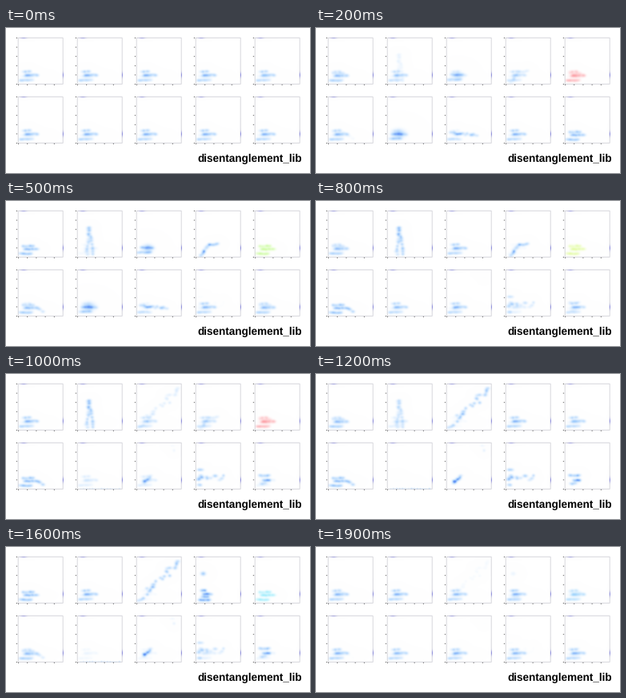
Write a matplotlib script that moves like this. It is 380 px wide and 182 px high and loops after 2 s.

```python
import colorsys

import matplotlib.pyplot as plt
import numpy as np
from matplotlib.animation import FuncAnimation
from matplotlib.patches import Rectangle

W, H, DPI = 380, 182, 100
FRAMES, INTERVAL = 20, 100
PW, PH = 57, 59              # panel size in pixels
COLS, STEP = 5, 74

plt.rcParams["text.hinting"] = "none"

X, Y = np.meshgrid(np.arange(PW), np.arange(PH))
rng = np.random.default_rng(7)


def lump(x, y, sx, sy, strength):
    return strength * np.exp(-((X - x) / sx) ** 2 / 2 - ((Y - y) / sy) ** 2 / 2)


def trail(a, b, n, spread=1.0, size=1.4, strength=.5):
    """Uneven soft lumps strewn along the line from a to b."""
    total = np.zeros((PH, PW))
    for t in (np.arange(n) + .5) / n:
        x, y = np.add(a, t * np.subtract(b, a)) + rng.uniform(-spread, spread, 2)
        total += lump(x, y, size * rng.uniform(1, 1.5), size,
                      strength * rng.uniform(.4, 1))
    return total


def rows(*spans, strength=.4):
    """Horizontal bands, each given as (x start, x end, y)."""
    return sum(trail((x0, y), (x1, y), round((x1 - x0) / 2.5), .5,
                     strength=strength) for x0, x1, y in spans)


CAR = rows((5, 16, 42), (8, 25, 46.5), (1, 18, 53)) + lump(12, 48, 5, 1.5, .3)
SOFT = rows((4, 21, 44), (6, 25, 48), (1, 18, 53.5))
COLUMN = (trail((14, 20), (12, 56), 11, .8) + trail((14, 20), (20, 56), 11, .8))
ROUND = lump(14, 46.5, 4, 3, .6) + rows((4, 21, 46), (1, 18, 52))
DIAGONAL = trail((3, 55), (54, 3), 26, 4)
ARCH = trail((6, 56), (15, 43), 8) + trail((15, 43), (28, 41), 5)
STACK = lump(9, 21, 2.2, 1.8, .6) + rows((6, 13, 42), (8, 20, 46.5),
                                         (6, 16, 50), (4, 19, 54), strength=.6)
TAIL = SOFT + trail((24, 47), (31, 53), 3)
BLOCK = lump(14, 46, 5, 3.5, .8) + rows((4, 24, 47), (2, 18, 52))
FLOOR = trail((2, 57.5), (54, 57.5), 14, .3, .8, .35)
SPREAD = trail((3, 45), (39, 48), 15, 1.5) + rows((1, 18, 53), strength=.3)
KNOT = trail((7, 52), (17, 42), 11, 2) + trail((45, 1), (46, 12), 2, strength=.2)
SCATTER = trail((4, 32), (5, 55), 9, 3) + trail((8, 43), (37, 44), 9, 3)
SLIM = trail((10, 47), (20, 47), 5, .4, strength=.7) + rows((4, 19, 41), (5, 14, 51))

# Start of each panel's sweep and the shapes at its low and high ends.
PANELS = [(.5, SOFT, SOFT), (.2, CAR, COLUMN), (.6, DIAGONAL, ROUND),
          (.4, STACK, ARCH), (.4, SOFT, SOFT),
          (0, CAR, TAIL), (.65, FLOOR, BLOCK), (.65, KNOT, SPREAD),
          (.8, SCATTER, CAR), (.7, SLIM, SOFT)]
RAINBOW = 4                  # the panel whose sweep changes the hue

LIGHT = np.array([.49, .73, .985])
DARK = np.array([.36, .5, .95])
LAVENDER = np.array([.55, .55, .95])
EDGES = (lump(56, 46.5, .5, 2.3, .9) + lump(6.5, 0, 2.6, .6, .6))[..., None]


def ease(t):
    t = np.clip(t, 0, 1)
    return t * t * (3 - 2 * t)


def latent(start, frame):
    """Sweep up to 1, down to 0 and back to the start."""
    u = (start + 2 * frame / FRAMES) % 2
    return min(u, 2 - u)


def rainbow(p):
    hue = np.interp(p, [0, .4, .6, .8, 1], [190, 211, 356, 437, 465]) % 360
    return np.array(colorsys.hsv_to_rgb(hue / 360, .47, .985))


def panel(index, frame):
    start, low, high = PANELS[index]
    p = latent(start, frame)
    down = ease(1.2 * (start - p) / max(start, .01))
    up = ease(1.2 * (p - start) / (1 - start))
    density = ((1 - down - up) * CAR + down * low + up * high)[..., None]
    if index == RAINBOW:
        tint = rainbow(p)
    else:
        tint = LIGHT + np.clip(density - .5, 0, 1) * (DARK - LIGHT)
    ink = 1 - np.clip(density, 0, 1) * (1 - tint)
    return ink * (1 - EDGES * (1 - LAVENDER))


def corner(index):
    row, col = divmod(index, COLS)
    return 15 + STEP * col, 12 + STEP * row


def stage(frame):
    img = np.ones((H, W, 3))
    for i in range(len(PANELS)):
        x, y = corner(i)
        img[y:y + PH, x:x + PW] = panel(i, frame)
    return img


fig = plt.figure(figsize=(W / DPI, H / DPI), dpi=DPI, facecolor="white")
ax = fig.add_axes([0, 0, 1, 1])
ax.axis("off")
view = ax.imshow(stage(0), extent=(0, W, H, 0), aspect="auto",
                 interpolation="nearest")
ax.set(xlim=(0, W), ylim=(H, 0))


def tick(xs, ys):
    ax.plot(xs, ys, color="#222", lw=.65, alpha=.75, solid_capstyle="butt",
            snap=False)


for i in range(len(PANELS)):
    left, top = corner(i)
    ax.add_patch(Rectangle((left + .2, top + .4), PW - 1, PH - 1, fill=False,
                           ec="#8c8c9c", lw=.72, alpha=.34, snap=False))
    for k in range(6):
        y = top + .5 + k * 11.6
        tick([left - 2.2, left - .9], [y, y])
    for k in range(5):
        x = left + .5 + k * 11.2
        tick([x, x], [top + PH - .2, top + PH + 1])

ax.text(305, 168, "disentanglement_lib", family="Liberation Sans",
        weight="bold", size=9.75, color="black", ha="center", va="baseline")


def update(frame):
    view.set_data(stage(frame))
    return [view]


anim = FuncAnimation(fig, update, frames=FRAMES, interval=INTERVAL,
                     repeat=True, repeat_delay=0)
plt.show()
```
